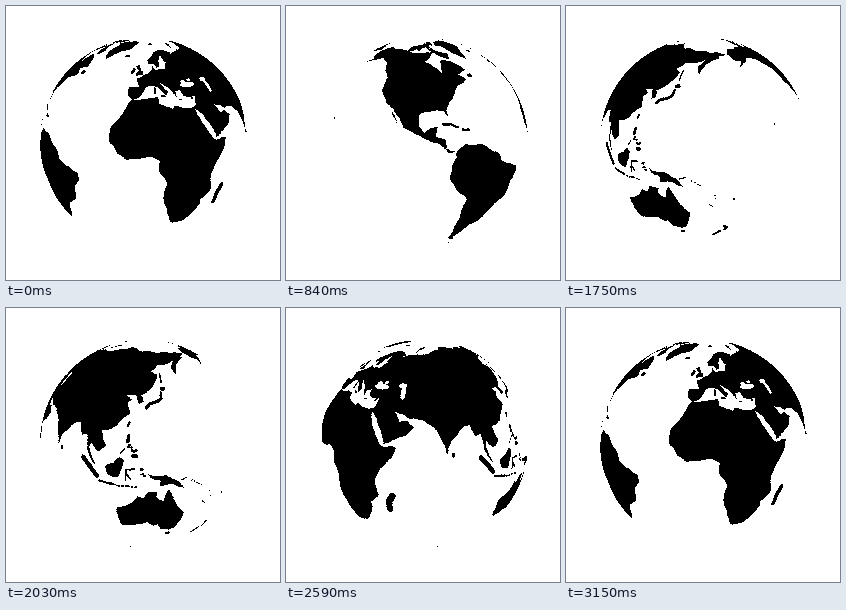
Recreate the animation shown at these times as an HTML page with a canvas. Size 274x274 px, loop 3220 ms.

```html
<!DOCTYPE html>
<html lang="en">
<head>
<meta charset="utf-8">
<title>Rotating globe</title>
<style>
html, body { margin: 0; width: 100%; height: 100%; overflow: hidden; background: #fff; }
canvas { display: block; }
</style>
</head>
<body>
<canvas id="globe" width="274" height="274"></canvas>
<script>
// Flat map in degrees, longitude to the right and latitude up
const CELLS = 4, MAP_W = 360 * CELLS, MAP_H = 180 * CELLS;
const chart = document.createElement('canvas');
chart.width = MAP_W;
chart.height = MAP_H;
const map = chart.getContext('2d', { willReadFrequently: true });
map.fillStyle = '#fff';
map.fillRect(0, 0, MAP_W, MAP_H);
map.setTransform(CELLS, 0, 0, -CELLS, MAP_W / 2, MAP_H / 2);
map.lineCap = map.lineJoin = 'round';
map.fillStyle = map.strokeStyle = '#000';

let seed = 7;
const random = () => (seed = seed * 16807 % 2147483647) / 2147483647;
const between = (a, b) => a + (b - a) * random();

// Rough line: split at shifted midpoints until the pieces are short
function coast(x0, y0, x1, y1) {
  const dx = x1 - x0, dy = y1 - y0;
  if (Math.hypot(dx, dy) < 1.5) return map.lineTo(x1, y1);
  const push = between(-.08, .08);
  const mx = (x0 + x1) / 2 - dy * push, my = (y0 + y1) / 2 + dx * push;
  coast(x0, y0, mx, my);
  coast(mx, my, x1, y1);
}

function land(...p) {
  map.beginPath();
  map.moveTo(p[0], p[1]);
  for (let i = 0; i < p.length; i += 2)
    coast(p[i], p[i + 1], p[(i + 2) % p.length], p[(i + 3) % p.length]);
  map.fill();
}

// Long island along a few points
function strip(width, ...p) {
  map.lineWidth = width;
  map.beginPath();
  for (let i = 0; i < p.length; i += 2) map.lineTo(p[i], p[i + 1]);
  map.stroke();
}

function blob(lon, lat, rx, ry = rx, color = '#000') {
  map.fillStyle = color;
  map.beginPath();
  map.ellipse(lon, lat, rx, ry, 0, 0, Math.PI * 2);
  map.fill();
  map.fillStyle = '#000';
}

// Islets strewn around a line
function isles(count, size, spread, lon0, lat0, lon1, lat1) {
  for (let i = 0; i < count; i++) {
    const t = (i + .5) / count;
    blob(lon0 + (lon1 - lon0) * t + between(-spread, spread),
      lat0 + (lat1 - lat0) * t + between(-spread, spread),
      size * between(.7, 1.4), size * between(.5, 1));
  }
}

// Africa
land(-6,36, -10,30, -17,21, -17.3,14, -12.5,7.4, -7.5,4.4, 4,6.4, 9.5,4, 9,-1, 13.5,-9, 12,-17,
  15,-27, 18.3,-34, 20,-34.8, 26,-34, 32,-28.5, 35,-23, 35,-19.8, 40.5,-15, 39,-6, 44,1, 51,11.5,
  43.5,11.3, 37.5,19, 32.5,30.5, 20.5,32, 19,30.4, 10.5,34, 10.5,37, 0,36);
strip(3.6, 45.8,-23.5, 46.2,-18.5, 48.4,-14.5);

// South America
land(-77.5,8, -72,12, -62,10.6, -51.5,4.2, -49.5,0, -44,-2.7, -35.2,-5.5, -35,-8.5, -39,-13.5,
  -40.5,-21.5, -48,-25.5, -53.5,-34, -57.5,-37.5, -62,-39, -65.5,-45, -69,-51, -66,-55, -74,-52,
  -73.5,-38, -70.3,-19, -76,-14, -81,-5.5, -80,1, -77.5,5);

// North and Central America
land(-77.5,8, -82,8, -87.5,13, -95,15.9, -105.5,20.5, -112.8,30, -114.5,31, -109.7,23, -117,32.5,
  -124,40, -124,48, -134,58, -146,60.8, -164,54.7, -158,59, -165,61, -167,65.7, -163,69.3,
  -156,71.3, -128,70, -95,68, -82,69, -94,60, -82,55, -79.5,51.5, -77,61, -70,61, -65,59.5,
  -56,52.5, -66,50, -61,46, -70,43, -75.8,36, -81,31, -80.3,25.2, -83,29.5, -90,29.5, -97,28,
  -97.5,22, -94.5,18.2, -90.5,21, -87,21.3, -88.5,16, -83.3,15, -83,10);
land(-43.5,60, -53,66, -58,75, -70,77, -60,82, -35,83.5, -15,82, -21,72, -39,65.5);
land(-65,62, -76,65, -88,72, -80,73.6, -62,67);
strip(2.5, -57,48.5, -55,48.5);
strip(1.2, -84,22.4, -80,22.5, -75.5,20.5);
strip(1.4, -73,19, -69.5,18.7);
isles(12, 4, 1.5, -118, 72, -75, 80);

// Europe
land(-5.6,36, -9.3,38.5, -9,43, -1.5,43.4, -4.5,48.3, 1.6,50.8, 8.2,54, 9.5,57.5, 11,54.2,
  20.5,54.7, 23.5,59, 30,60, 60,60, 60,40, 27,41, 23,40, 23,36.5, 19.5,41.5, 13,45.5, 18.3,40,
  16,38, 11,42.7, 8,44.2, 3.2,43, 0,39, -2,36.8);
land(30,58, 29,60, 22.5,60, 22,65.5, 17.3,61.5, 16,56.5, 13,55.5, 11,59, 6,58.3, 5.3,62, 15,68.5,
  27,71, 40,67.3, 34,65, 44,67.5, 60,69, 60,57);
land(-5.5,50, 1.3,51.2, 0,53.3, -2,56, -3,58.6, -6,57, -3,54, -5,52);
strip(2.6, -8.3,52.7, -7.3,54.2);
strip(2, -21,64.7, -17,65);
strip(1.2, 8.8,39.5, 9,42.5);
strip(1, 12.8,37.7, 15,37.4);
strip(.7, 24,35.2, 26,35.2);
strip(.8, 32.7,34.9, 34,35.3);
strip(2, 54,71.5, 57,74.5, 66,76.5);
blob(18, 78.5, 6, 1.5);

// Asia
land(26.5,40, 28,36.8, 36,36.4, 34.5,31.3, 32.5,30, 35,28, 42.8,16, 44,12.8, 55,17.5, 59.8,22.4,
  56,25.5, 51.5,24.8, 48,30, 57,26.5, 66.5,25.2, 72,40, 60,44, 42,44, 36,42, 27,41.2);
land(66,25.3, 72.7,20.5, 77.5,8, 80.2,15, 87,21.3, 91.5,22.5, 94.3,16, 97.5,16.7, 98.5,9,
  103.8,1.4, 100,9.5, 100.3,13.3, 105,8.8, 109.2,12, 106,19.5, 114,22.4, 121.8,29.5, 119.3,35,
  122,37.2, 118,39, 124.5,39.8, 126.4,34.5, 129.3,36, 127.7,39.6, 135,43.5, 141,52, 136,54.7,
  143,59.2, 155,59.5, 163,62, 156,57, 157,51, 163,58, 179.5,62.5, 180,69, 140,72.5, 105,77.5,
  80,72.5, 68,69, 50,68.5, 45,60, 45,45, 60,38);
land(-180,69, -170,66.1, -173,64.4, -180,65);
strip(1.8, 131,32.5, 133,34.5, 138,35.8, 140.5,37.5, 141,40.5);
strip(2.4, 141.8,43, 143.5,43.2);
strip(1.3, 142.5,47, 143,53);
strip(1.2, 120.6,23, 121.3,24.7);
blob(80.8, 7.5, .9, 1.4);

// South-east Asian islands
strip(1.9, 121.2,17.5, 121,15);
strip(2, 124,7.5, 125.5,7.5);
isles(6, .8, .7, 121, 13, 125, 9.5);
strip(.7, 117.5,8.7, 119.3,11);
strip(2.6, 96.3,4.7, 100.5,.5, 104.5,-4);
strip(1.3, 106,-6.7, 114,-8);
land(109,1.5, 113.5,3.7, 117,7, 119,5.2, 117.5,0, 116,-4, 110.5,-2.8);
strip(1, 124.5,.8, 120.3,.4, 120,-5);
strip(1, 120.5,-2, 122.5,-4.5);
isles(6, .8, .3, 115.5, -8.5, 126, -8.8);
isles(5, .7, 1, 128, 1.5, 129, -4);

// Oceania
land(131,-.8, 134.5,-3, 141,-2.6, 147.8,-6.5, 150.8,-10.4, 144.5,-7.7, 138,-8.3, 138,-5.5, 133,-4);
land(142.5,-10.8, 145.3,-15, 149.5,-22, 153.2,-26, 152.5,-32, 150,-37.3, 146.5,-39, 140.6,-38,
  138,-33.5, 135.5,-34.7, 131.2,-31.5, 123.7,-33.9, 118,-35, 115.2,-34, 113.6,-25, 114,-22,
  121.5,-19, 126,-14.3, 129.5,-15, 132,-11.5, 136.8,-12.2, 136,-15, 140,-17.6);
blob(146.5, -42.2, 1.7, 1.3);
strip(2, 175,-37.3, 177,-38.5, 175.5,-40.5);
strip(2.2, 172.5,-42, 168.3,-45.5);
strip(.7, 149,-5.8, 151.8,-4.8);
strip(.6, 164.2,-20.4, 166.6,-22);
isles(5, .45, .3, 154.5, -6, 162, -10.5);
isles(3, .4, .4, 166.5, -14, 169, -19);
blob(178, -17.8, .6);
blob(-155.6, 19.6, .5);

// Antarctica: wider towards the Indian Ocean
map.beginPath();
for (let lon = -180; lon <= 180; lon += 3)
  map.lineTo(lon, -71 + 4.7 * Math.cos((lon - 100) * Math.PI / 180) + between(-.4, .4));
map.lineTo(180, -90);
map.lineTo(-180, -90);
map.fill();
strip(2.5, -58,-63.8, -65,-70, -68,-76);

// Inland seas
blob(34, 43.2, 6, 1.7, '#fff');
blob(31.5, 45, 2, 1.3, '#fff');
blob(36.8, 46, 1.8, .8, '#fff');
blob(50.3, 44.8, 3, 1.6, '#fff');
blob(51.4, 40.5, 1.8, 3.9, '#fff');

const terrain = new Uint32Array(map.getImageData(0, 0, MAP_W, MAP_H).data.buffer);

// Perspective view: eye distance in globe radii, tilted north
const SIZE = 274, CX = 138, CY = 135.5, RADIUS = 104, EYE = 12, START_DEG = 1.5;
const TILT = 14 * Math.PI / 180, SIN = Math.sin(TILT), COS = Math.cos(TILT);
const DEG = 180 / Math.PI, HORIZON = EYE * EYE - 1;
const spots = [];
for (let py = 0; py < SIZE; py++) {
  for (let px = 0; px < SIZE; px++) {
    const u = (px + .5 - CX) / RADIUS, v = (CY - py - .5) / RADIUS;
    if (u * u + v * v >= 1) continue;
    const q = 1 + (u * u + v * v) / HORIZON;
    const ray = (EYE - Math.sqrt(EYE * EYE - q * HORIZON)) / q;
    const scale = ray / Math.sqrt(HORIZON);
    const x = u * scale, y = v * scale, z = EYE - ray;
    const lat = Math.asin(y * COS + z * SIN) * DEG;
    const lon = Math.atan2(x, z * COS - y * SIN) * DEG + START_DEG;
    spots.push({
      pixel: py * SIZE + px,
      row: Math.min(MAP_H - 1, Math.floor((90 - lat) * CELLS)) * MAP_W,
      col: Math.floor((lon + 180) * CELLS)
    });
  }
}

const ctx = document.getElementById('globe').getContext('2d');
const view = ctx.createImageData(SIZE, SIZE);
const pixels = new Uint32Array(view.data.buffer);
const WHITE = 0xffffffff, BLACK = 0xff000000;
const STEP_MS = 70, LOOP_MS = 3220, STEP_DEG = 8;
let shown = -1;

function draw(now) {
  const step = Math.floor(now % LOOP_MS / STEP_MS);
  if (step !== shown) {
    shown = step;
    const shift = MAP_W * 2 - step * STEP_DEG * CELLS;
    pixels.fill(WHITE);
    for (const { pixel, row, col } of spots)
      if ((terrain[row + (col + shift) % MAP_W] & 255) < 128) pixels[pixel] = BLACK;
    ctx.putImageData(view, 0, 0);
  }
  requestAnimationFrame(draw);
}
draw(performance.now());
</script>
</body>
</html>
```
